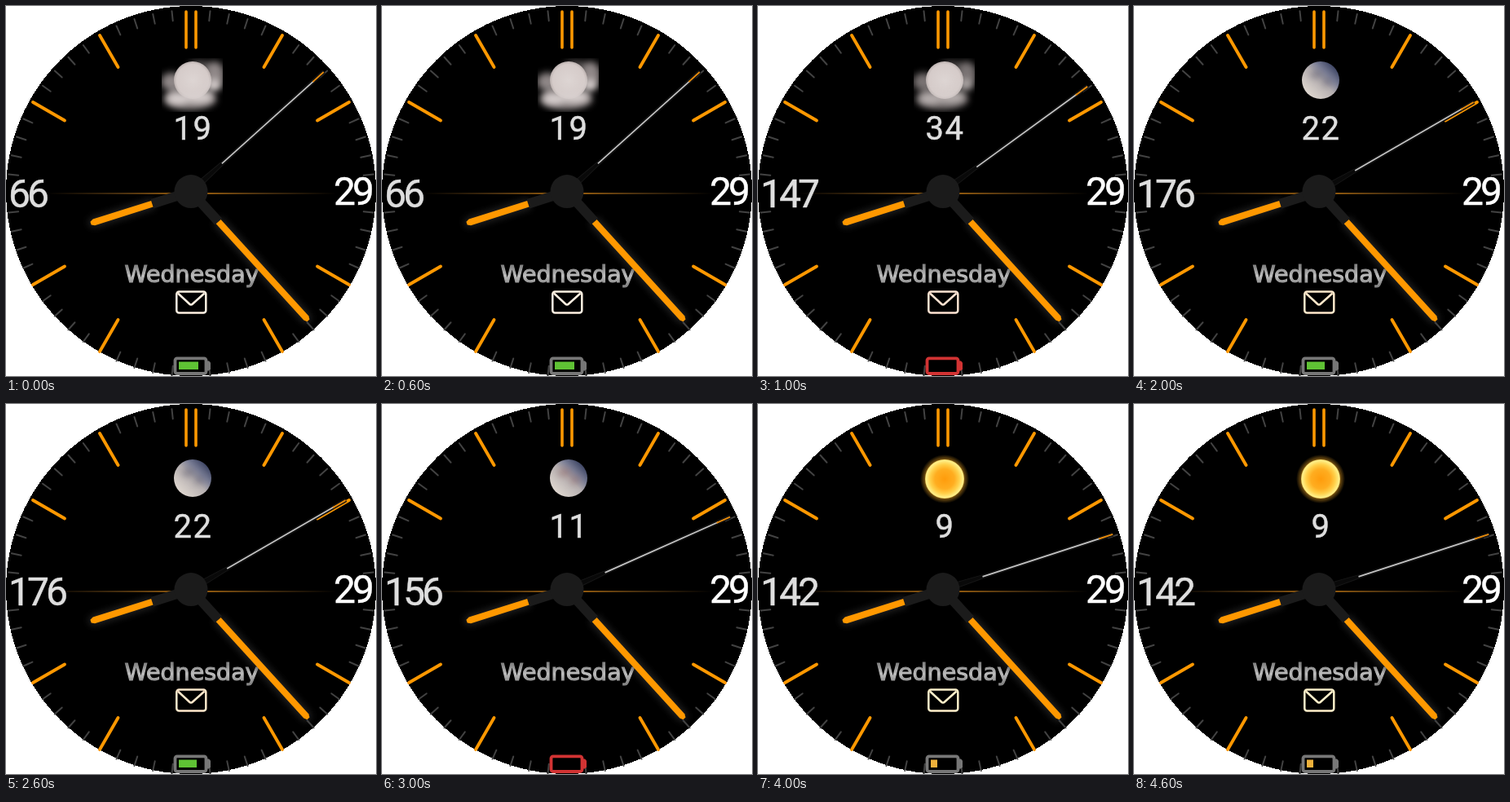
An HTML page for the animation above (5000 ms loop, 454 by 454 pixels).

```html
<!DOCTYPE html>
<html lang="en">
<head>
<meta charset="utf-8">
<title>Watch face</title>
<style>
  html, body { margin: 0; width: 100%; height: 100%; overflow: hidden; background: #fff; }
  svg { display: block; width: 100%; height: 100%; }
  text { font-family: Roboto, Arial, sans-serif; stroke-width: .5; }
  .side { font-size: 48px; letter-spacing: -4px; }
  .temp { font-size: 40px; letter-spacing: 1.5px; text-anchor: middle; }
  .pale { fill: #dedede; stroke: #dedede; }
  .date { fill: #fff; stroke: #fff; }
  .day { font: 28.5px "DejaVu Sans", sans-serif; text-anchor: middle; fill: url(#silver); stroke: url(#silver); stroke-width: 1.2; }
</style>
</head>
<body>
<svg viewBox="0 0 454 454" xmlns="http://www.w3.org/2000/svg">
  <defs>
    <linearGradient id="silver" x1="0" y1="0" x2="0" y2="1">
      <stop offset=".2" stop-color="#858585"/>
      <stop offset=".55" stop-color="#bdbdbd"/>
      <stop offset=".9" stop-color="#858585"/>
    </linearGradient>
    <linearGradient id="horizon">
      <stop offset="0" stop-color="#8a5a1c" stop-opacity="0"/>
      <stop offset=".25" stop-color="#8a5a1c" stop-opacity=".5"/>
      <stop offset=".5" stop-color="#c87a10" stop-opacity=".85"/>
      <stop offset=".75" stop-color="#8a5a1c" stop-opacity=".5"/>
      <stop offset="1" stop-color="#8a5a1c" stop-opacity="0"/>
    </linearGradient>
    <linearGradient id="moonLight" x1=".15" y1=".85" x2=".85" y2=".15">
      <stop offset="0" stop-color="#ddd5ce"/>
      <stop offset=".5" stop-color="#b5afb0"/>
      <stop offset=".75" stop-color="#787c94"/>
      <stop offset="1" stop-color="#414866"/>
    </linearGradient>
    <radialGradient id="paleMoon">
      <stop offset="0" stop-color="#ddd5d3"/>
      <stop offset=".85" stop-color="#d5cbc9"/>
      <stop offset="1" stop-color="#bcb2b0"/>
    </radialGradient>
    <radialGradient id="sunFill">
      <stop offset="0" stop-color="#ff9c0c"/>
      <stop offset=".5" stop-color="#ffad20"/>
      <stop offset=".75" stop-color="#ffd04a"/>
      <stop offset=".95" stop-color="#fff08a"/>
      <stop offset="1" stop-color="#e8c75a"/>
    </radialGradient>
    <radialGradient id="sunHalo">
      <stop offset=".72" stop-color="#c98a1c" stop-opacity=".8"/>
      <stop offset="1" stop-color="#c98a1c" stop-opacity="0"/>
    </radialGradient>
    <filter id="soft" x="-30%" y="-30%" width="160%" height="160%"><feGaussianBlur stdDeviation="4"/></filter>
    <filter id="glow" filterUnits="userSpaceOnUse" x="-30" y="-250" width="60" height="280"><feGaussianBlur stdDeviation="4"/></filter>
    <clipPath id="cloudBox"><rect x="191" y="64" width="75" height="66"/></clipPath>
  </defs>

  <circle cx="227" cy="227" r="227" shape-rendering="crispEdges"/>
  <g id="ticks" stroke-linecap="round"></g>
  <rect x="50" y="229" width="355" height="2" fill="url(#horizon)"/>

  <g id="cloudy">
    <g clip-path="url(#cloudBox)">
      <g id="cloudBack" filter="url(#soft)" fill="#8f8787">
        <ellipse cx="203" cy="93" rx="13" ry="11"/>
        <ellipse cx="256" cy="84" rx="12" ry="16"/>
        <ellipse cx="238" cy="72" rx="14" ry="5" opacity=".6"/>
        <ellipse cx="226" cy="114" rx="32" ry="13"/>
      </g>
    </g>
    <circle cx="229" cy="91" r="23" fill="url(#paleMoon)"/>
    <g clip-path="url(#cloudBox)">
      <g id="cloudFront" filter="url(#soft)" fill="#d8d0cf">
        <ellipse cx="211" cy="114" rx="14" ry="7"/>
        <ellipse cx="236" cy="112" rx="18" ry="7"/>
        <ellipse cx="255" cy="97" rx="9" ry="7"/>
      </g>
    </g>
  </g>
  <g id="moon">
    <circle cx="229" cy="91" r="23" fill="url(#moonLight)"/>
    <g id="craters" filter="url(#soft)" opacity=".55">
      <ellipse cx="224" cy="84" rx="8" ry="5"/>
      <ellipse cx="237" cy="93" rx="6" ry="5"/>
    </g>
  </g>
  <g id="sun">
    <circle cx="229" cy="92" r="30" fill="url(#sunHalo)"/>
    <circle cx="229" cy="92" r="24" fill="url(#sunFill)"/>
  </g>

  <text id="temp" class="temp pale" x="229.5" y="164.3"></text>
  <text id="count" class="side pale" x="3" y="247"></text>
  <text class="side date" x="402" y="243.5">29</text>
  <text class="day" x="228" y="339">Wednesday</text>

  <g id="mail" fill="none" stroke-width="2.5" stroke-linejoin="round">
    <rect x="209.3" y="350.5" width="36" height="26" rx="3"/>
    <path d="M211 352.5L225 365.5Q227 367.5 229 365.5L243.5 352.5"/>
  </g>

  <g id="battery">
    <rect x="207.5" y="432.3" width="38" height="18.7" rx="2.5" fill="#000" stroke="currentColor" stroke-width="3.8"/>
    <path d="M247 435.5h2l2 2v8l-2 2h-2z" fill="currentColor"/>
    <rect id="charge" x="212" y="436.5" height="9.5"/>
  </g>

  <g id="hands" transform="translate(227 227.6)"></g>
</svg>
<script>
const STEP = 1000;
const ORANGE = '#ff9800';
const states = [
  { sky: 'cloudy', temp: 19, count: 66, mail: '#fff1e2', battery: '#777', charge: 24, fill: '#5fc234' },
  { sky: 'cloudy', dim: true, temp: 34, count: 147, mail: '#ffe3d2', battery: '#d23333', charge: 0 },
  { sky: 'moon', shade: '#59566b', temp: 22, count: 176, mail: '#ffe8cb', battery: '#777', charge: 22, fill: '#5fc234' },
  { sky: 'moon', shade: '#8b5f60', temp: 11, count: 156, battery: '#d23333', charge: 0 },
  { sky: 'sun', temp: 9, count: 142, mail: '#fff0ca', battery: '#777', charge: 8, fill: '#efb13b' }
];

const $ = id => document.getElementById(id);
const set = (node, attrs) => {
  for (const key in attrs) node.setAttribute(key, attrs[key]);
  return node;
};
const add = (parent, tag, attrs) =>
  parent.appendChild(set(document.createElementNS('http://www.w3.org/2000/svg', tag), attrs));

function drawTicks() {
  const tick = (angle, x, y1, y2, stroke, width) => add($('ticks'), 'line', {
    x1: x, x2: x, y1, y2, stroke, 'stroke-width': width,
    transform: `translate(227 230) rotate(${angle})`
  });
  for (let minute = 0; minute < 60; minute++) {
    if (minute % 15 === 0) continue;
    if (minute % 5) tick(minute * 6, 0, -225, -213, '#424242', 2);
    else tick(minute * 6, 0, -224, -179, ORANGE, 3.9);
  }
  for (const x of [-6, 6]) tick(0, x, -223, -179, ORANGE, 3.6);
}

function drawHand(angle, length) {
  const hand = add($('hands'), 'g', { transform: `rotate(${angle})` });
  const blade = `M-4 -50H4V${4 - length}L2 ${-length}H-2L-4 ${4 - length}Z`;
  add(hand, 'path', { d: blade, fill: '#444', stroke: '#444', 'stroke-width': 5, opacity: .5, filter: 'url(#glow)' });
  add(hand, 'rect', { x: -6, y: -50, width: 12, height: 50, fill: '#1b1b1b' });
  add(hand, 'path', { d: blade, fill: ORANGE });
}

function drawSecondHand() {
  const hand = add($('hands'), 'g', {});
  add(hand, 'path', { d: 'M-4 0L-2 -52V-219H2V-52L4 0Z', fill: '#090909', stroke: '#161616', 'stroke-width': 1 });
  add(hand, 'path', { d: 'M0 -51V-203', stroke: '#c4c4c4', 'stroke-width': 1.7 });
  add(hand, 'path', { d: 'M0 -201V-219', stroke: '#e88c0e', 'stroke-width': 1.9 });
  return hand;
}

drawTicks();
drawHand(252.4, 129);
drawHand(137.7, 214);
const secondHand = drawSecondHand();
add($('hands'), 'circle', { r: 20.5, fill: '#1b1b1b' });

function show(index) {
  const s = states[index];
  for (const sky of ['cloudy', 'moon', 'sun']) set($(sky), { display: sky === s.sky ? 'inline' : 'none' });
  set($('cloudBack'), { opacity: s.dim ? .85 : 1 });
  set($('cloudFront'), { opacity: s.dim ? .65 : 1 });
  set($('craters'), { fill: s.shade || 'none' });
  $('temp').textContent = s.temp;
  $('count').textContent = s.count;
  set($('mail'), { stroke: s.mail || 'none' });
  set($('battery'), { color: s.battery });
  set($('charge'), { width: s.charge, fill: s.fill || 'none' });
  set(secondHand, { transform: `rotate(${48 + index * 6})` });
}

const start = performance.now();
let shown = -1;
function frame(now) {
  const index = Math.floor(Math.max(0, now - start) / STEP) % states.length;
  if (index !== shown) show(shown = index);
  requestAnimationFrame(frame);
}
frame(start);
</script>
</body>
</html>
```
